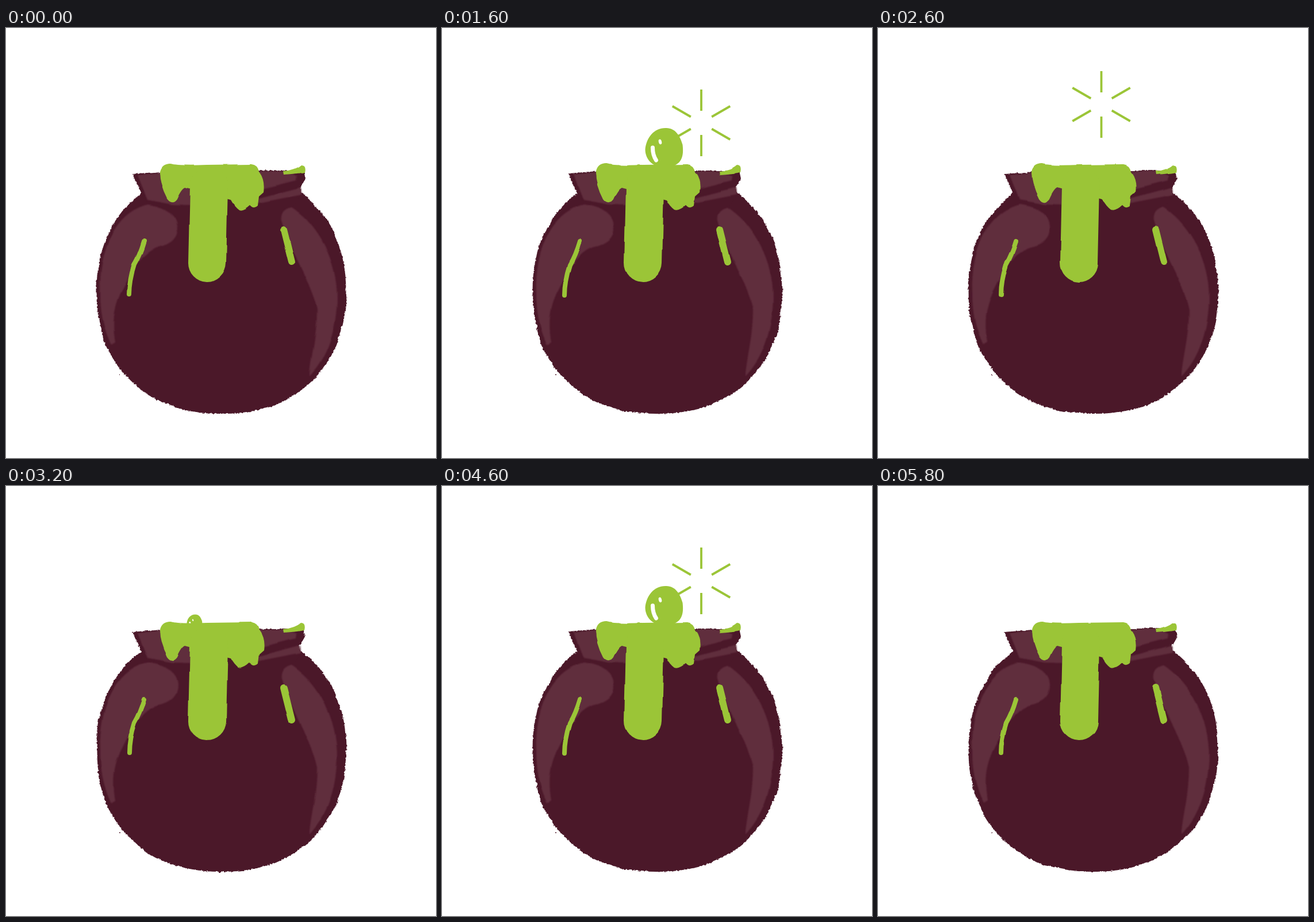
Write an HTML page that moves like this. It is 748 by 748 pixels and loops after 6.01 s.

```html
<!DOCTYPE html>
<html lang="en">
<head>
<meta charset="utf-8">
<title>Bubbling pot</title>
<style>
  html, body { margin: 0; width: 100%; height: 100%; overflow: hidden; background: #fff; }
  svg { display: block; width: 100vw; height: 100vh; }
  .dark { fill: #4b1829; }
  .light { fill: #612d3e; }
  .green { fill: #9bc537; }
  .white { fill: #fff; }
  .line { fill: none; stroke: #9bc537; stroke-linecap: round; }
  .glint { fill: none; stroke: #fff; stroke-width: 7; stroke-linecap: round; }
</style>
</head>
<body>
<svg viewBox="0 0 748 748">
  <defs>
    <filter id="wobble" filterUnits="userSpaceOnUse" x="0" y="0" width="748" height="748" color-interpolation-filters="sRGB">
      <feTurbulence class="noise" type="fractalNoise" baseFrequency="0.03" numOctaves="1"/>
      <feDisplacementMap in="SourceGraphic" scale="5" xChannelSelector="R" yChannelSelector="G"/>
    </filter>
    <filter id="rough" filterUnits="userSpaceOnUse" x="0" y="0" width="748" height="748" color-interpolation-filters="sRGB">
      <feTurbulence class="noise" type="fractalNoise" baseFrequency="0.3" numOctaves="1"/>
      <feDisplacementMap in="SourceGraphic" scale="4" xChannelSelector="R" yChannelSelector="G"/>
    </filter>
    <filter id="soft" filterUnits="userSpaceOnUse" x="0" y="0" width="748" height="748">
      <feGaussianBlur stdDeviation="0.9"/>
    </filter>
    <g id="ball">
      <path class="green" d="M-33 4C-31-16-18-33 2-33C20-34 28-18 32-4C34 14 33 35 0 35C-22 35-33 20-33 4Z"/>
      <path class="glint" d="M-20 1Q-20 14-14 23"/>
      <ellipse class="white" cx="-7" cy="-9" rx="2.6" ry="4.5" transform="rotate(-15 -7 -9)"/>
    </g>
  </defs>
  <g id="bursts"></g>
  <g id="bubbles"></g>
  <g filter="url(#wobble)">
    <g class="dark" filter="url(#rough)">
      <path id="body"/>
      <path d="M220 254L270 250L440 248H517L520 262L511 278L513 291L500 310H250L236 291Z"/>
      <circle cx="198" cy="603" r="1"/>
    </g>
    <g class="light" filter="url(#soft)">
      <path d="M247 307Q298 315 299 345Q300 374 265 381C235 390 215 430 200 460C186 490 185 515 190 547L183 551C168 520 164 490 164 460C162 385 190 320 247 307Z"/>
      <path d="M497 312C540 340 576 400 576 470C574 540 552 580 528 606C528 580 541 540 541 490C534 450 500 400 480 335Q478 316 497 312Z"/>
      <path d="M229 256L272 251H320V308L290 307L246 299Z"/>
      <path d="M430 249H485L505 257L504 265L430 284Z"/>
      <path d="M436 297L512 277L513 290L436 305Z"/>
    </g>
    <path class="green" d="M268 250Q271 236 286 236Q300 240 350 238L427 237Q438 238 440 250Q451 264 448 285L440 292L438 309Q431 316 424 308Q412 319 405 316Q397 310 391 299L312 278Q306 280 298 298Q290 309 281 297Q268 272 268 250Z"/>
    <path class="line" stroke-width="66" d="M353 275L350 409"/>
    <path class="line" stroke-width="8" d="M240 371Q233 395 223 412Q214 440 214 464"/>
    <path class="line" stroke-width="12" d="M483 351L497 407"/>
    <path class="green" d="M483 249Q503 247 513 238Q522 238 519 251Q503 254 484 255Z"/>
  </g>
</svg>
<script>
const STEP = 200, LOOP = 6010, CYCLE = 15;
const SURFACE = 237, RISE = 30, SIZE = 33;
const $ = id => document.getElementById(id);

function add(parent, tag, attrs) {
  const el = document.createElementNS('http://www.w3.org/2000/svg', tag);
  for (const key in attrs) el.setAttribute(key, attrs[key]);
  return parent.appendChild(el);
}

// A slightly squared ellipse: power 2 would be a true one.
function roundPath(cx, cy, rx, ry, power) {
  const bend = v => Math.sign(v) * Math.abs(v) ** (2 / power);
  const points = Array.from({ length: 120 }, (_, i) => {
    const a = i * Math.PI / 60;
    return [cx + rx * bend(Math.cos(a)), cy + ry * bend(Math.sin(a))];
  });
  return 'M' + points.join('L') + 'Z';
}
$('body').setAttribute('d', roundPath(374.5, 458.5, 217, 212.5, 2.2));

// Steps at which each bubble emerges and pops, and where it pops.
const bubbles = [
  { start: 1, end: 4, x: 330, y: 133 },
  { start: 4, end: 7, x: 451, y: 165 },
  { start: 7, end: 12, x: 388.5, y: 133 }
];

for (const b of bubbles) {
  b.ball = add($('bubbles'), 'use', { href: '#ball' });
  b.rays = add($('bursts'), 'g', { stroke: '#9bc537', transform: `translate(${b.x} ${b.y})` });
  for (let angle = 0; angle < 360; angle += 60) {
    add(b.rays, 'line', { x1: 0, x2: 0, transform: `rotate(${angle})` });
  }
}

function drawBubble(b, step) {
  const age = step - b.start, popped = step - b.end;
  const rising = age >= 0 && popped < 0;
  const bursting = popped === 0 || popped === 1;
  b.ball.style.display = rising ? '' : 'none';
  b.rays.style.display = bursting ? '' : 'none';
  if (rising) {
    const y = Math.max(b.y, SURFACE - RISE * age);
    const scale = Math.min(1, 0.41 + 0.59 * age);
    b.ball.setAttribute('transform', `translate(${b.x - 2} ${y}) scale(${scale})`);
  }
  if (bursting) {
    const inner = 8 + 13 * popped;
    for (const ray of b.rays.children) {
      ray.setAttribute('y1', -inner);
      ray.setAttribute('y2', -inner - 37);
      ray.setAttribute('stroke-width', 3.2 + 0.6 * popped);
    }
  }
}

const noise = document.querySelectorAll('.noise');
let shown = -1;

function draw(time) {
  const step = Math.min(29, Math.floor((time % LOOP) / STEP)) % CYCLE;
  if (step === shown) return;
  shown = step;
  noise.forEach((el, i) => el.setAttribute('seed', 3 + step * 2 + i));
  bubbles.forEach(b => drawBubble(b, step));
}

const begin = performance.now();
function tick() {
  draw(performance.now() - begin);
  requestAnimationFrame(tick);
}
tick();
</script>
</body>
</html>
```
